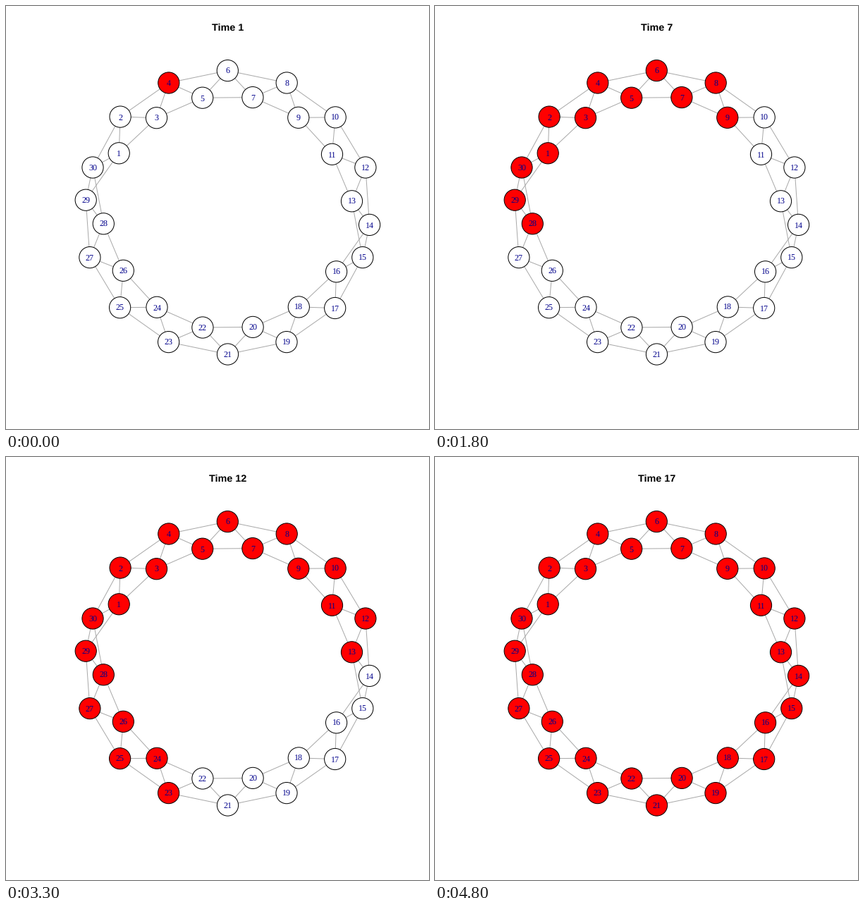
These frames come from a looping animation (600x600 px, 5.1 s). A matplotlib script:

```python
import matplotlib.pyplot as plt
from matplotlib.animation import FuncAnimation
from matplotlib.patches import Circle

plt.rcParams["text.hinting"] = "none"

SIZE, DPI = 600, 100
PX = 72 / DPI              # one pixel in points
CENTER = (314.4, 292.8)
RADIUS = 15.1
N, STEPS = 30, 17

# First half of the ring; the second half is its point reflection.
HALF = [
    (160.2, 208.8), (162.1, 157.1), (213.5, 158.7), (230.8, 109.0),
    (278.7, 130.2), (314.3, 91.6), (349.9, 129.6), (398.2, 109.0),
    (414.8, 158.3), (467.2, 157.9), (462.5, 210.3), (509.9, 229.0),
    (490.5, 276.8), (515.6, 310.4), (505.8, 356.6),
]
POS = HALF + [(2 * CENTER[0] - x, 2 * CENTER[1] - y) for x, y in HALF]

# Time step -> nodes newly infected at that step
SPREAD = {
    1: [4], 3: [2], 4: [1, 3, 5, 6, 30], 5: [7, 28, 29], 6: [8, 9],
    8: [11, 26], 9: [10, 25, 27], 10: [12, 24], 12: [13, 23],
    13: [14, 15, 22], 14: [20, 21], 15: [17], 16: [16, 19], 17: [18],
}
INFECTED_AT = {node: t for t, nodes in SPREAD.items() for node in nodes}

fig = plt.figure(figsize=(SIZE / DPI, SIZE / DPI), dpi=DPI, facecolor="white")
ax = fig.add_axes([0, 0, 1, 1])
ax.set(xlim=(0, SIZE), ylim=(SIZE, 0))
ax.axis("off")

# Ring lattice: each node is tied to the next two.
for i, (x, y) in enumerate(POS):
    for step in (1, 2):
        x2, y2 = POS[(i + step) % N]
        ax.plot([x, x2], [y, y2], color="darkgray", lw=PX, zorder=1)

nodes = []
for i, (x, y) in enumerate(POS, start=1):
    node = Circle((x, y), RADIUS, fc="white", ec="black", lw=PX, zorder=2)
    nodes.append(ax.add_patch(node))
    ax.text(x, y + 4.4, str(i), family="Liberation Serif", size=12 * PX,
            color="darkblue", ha="center", va="baseline", zorder=3)

title = ax.text(CENTER[0], 35, "", family="Liberation Sans", weight="bold",
                size=14.4 * PX, color="black", ha="center", va="baseline")


def update(frame):
    t = frame + 1
    title.set_text(f"Time {t}")
    for i, node in enumerate(nodes, start=1):
        node.set_facecolor("red" if INFECTED_AT[i] <= t else "white")
    return [title, *nodes]


anim = FuncAnimation(fig, update, frames=STEPS, init_func=lambda: update(0),
                     interval=300, repeat=True, repeat_delay=0, blit=False)
plt.show()
```
